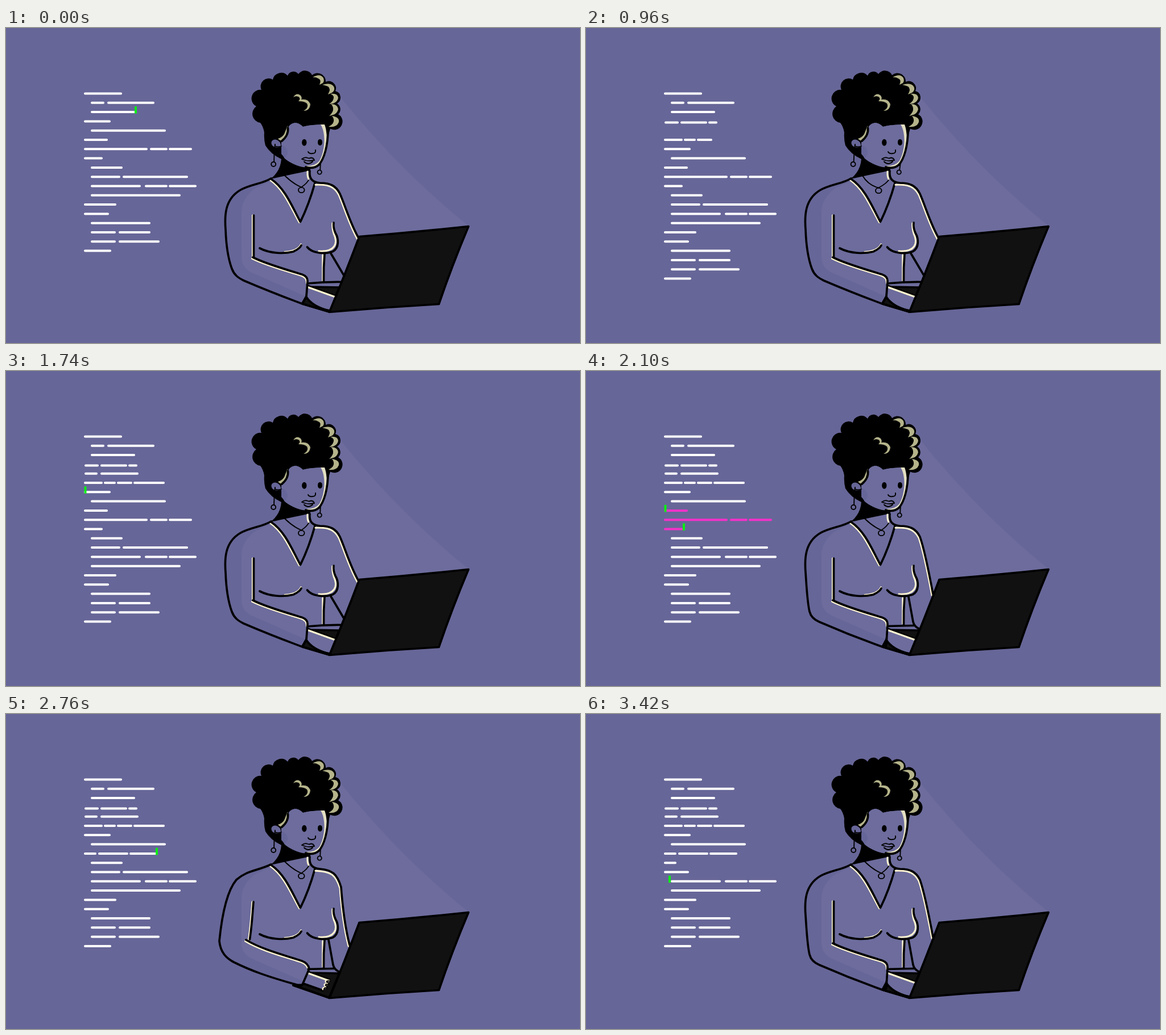
These frames come from a looping animation (1009 by 555 pixels, 3.54 s). An HTML page:

```html
<!DOCTYPE html>
<html lang="en">
<head>
<meta charset="utf-8">
<title>Coding at a laptop</title>
<style>
  html, body { margin: 0; width: 100%; height: 100%; overflow: hidden; background: #676698; }
  svg { display: block; width: 100%; height: 100%; }
  path, ellipse, circle { fill: none; stroke-linecap: round; stroke-linejoin: round; }
  .ink { stroke: #000; stroke-width: 3.7; }
  .thin { stroke: #000; stroke-width: 1.9; }
  .glow { stroke: #fff5d0; stroke-width: 3; }
  .black { fill: #000; }
  .lit { fill: #6d6c9d; }
  .shade { fill: #676698; }
  .olive { fill: #b5b48b; }
  .cream { fill: #e3dfc2; }
  .deck { fill: #111; }
  .code path { stroke-width: 4; }
</style>
</head>
<body>
<svg viewBox="0 0 1009 555" preserveAspectRatio="none">
  <path class="lit" d="M588 122Q690 249 813 349L620 367L568 500L525 472L432 431Q413 422 414 400V330Q412 300 440 281Q470 268 480 262L484 230L488 200L495 180L550 160Z"/>

  <g id="head">
    <path class="black" d="M482 205L484 230Q483 252 465 266L535 251V246Q505 247 484 222Z"/>
    <path class="black" d="M454 184Q452 173 447 167A16 16 0 0 1 440 138A15.400 15.400 0 0 1 449 109A14 14 0 0 1 469 91A15 15 0 0 1 495 84A11 11 0 0 1 514 81A14 14 0 0 1 538 83A14.500 14.500 0 0 1 562 95A12.500 12.500 0 0 1 579 111A12 12 0 0 1 582 133A12 12 0 0 1 584 152A14.500 14.500 0 0 1 570 177.500L568 184L565 196Q562 172 553 170Q531 171 522 174Q515 167 508 167Q496 169 495 180Q496 191 484 201L484 231Q465 222 456 207Q453 196 454 184Z"/>
    <path class="lit" d="M495 181Q496 169 508 167Q515 167 522 174Q531 171 553 170Q565 182 561 212Q555 241 538 245Q507 245 490 230Q484 222 484 203Z"/>
    <path class="shade" d="M484 207Q495 208 495 222L490 230Q483 221 484 207Z"/>
    <path class="olive" d="M495 172Q491 182 489 187Q485 193 478 195Q483 200 487 198Q495 190 495 173Z"/>
    <path class="ink" d="M495.500 176Q497 189 485 199"/>
    <path class="shade" d="M484 209Q474 213 468 207Q464 200 470 197Q476 195 482 202Z"/>
    <path class="thin" d="M484 208Q478 211 473 208"/>
    <path class="cream" d="M553 170C562 183 562 215 551 234Q543 244 526 243Q546 249 555 236C565 215 566 185 560 170Z"/>
    <path class="ink" d="M566 179C566 208 559 231 550 241Q541 249 527 245"/>
    <path class="olive" d="M539 87Q552 79 558 88Q560 94 557 97L551 100Q555 91 549 89Q544 86 539 87Z"/>
    <path class="olive" d="M556 100Q573 95 577 105Q578 111 573 114L566 117Q572 107 566 103Q561 101 556 100Z"/>
    <path class="olive" d="M570 116Q583 114 584 123Q583 130 575 133L568 134Q577 128 576 121Q574 117 570 116Z"/>
    <path class="olive" d="M571 134Q583 134 584 143Q582 151 575 153L568 155Q576 148 575 141Q574 136 571 134Z"/>
    <path class="olive" d="M573 155Q587 157 585 166Q581 176 567 174Q578 168 576 161Q575 157 573 155Z"/>
    <path class="olive" d="M505 122Q510 113 518 119Q521 123 519 126Q531 124 535 134Q534 146 523 146Q533 140 529 133Q525 129 514 129Q519 124 514 121Q509 119 505 122Z"/>
    <g id="open">
      <ellipse class="black" cx="524.300" cy="201.700" rx="4.200" ry="6"/>
      <ellipse class="black" cx="552" cy="201.400" rx="4" ry="5.700"/>
    </g>
    <path id="shut" class="ink" d="M521 203H527.500M549 203H555.500"/>
    <path class="thin" d="M544 215Q545 221 539 221Q533 222 531 218"/>
    <path class="thin" d="M520 231Q525 227 529 228.500Q533 230.500 536 228.500Q541 229 542 233M520 231Q531 236 541 233M524 235.500Q531 242.500 539 235.500"/>
  </g>

  <g id="jewels">
    <path id="chains" class="thin"/>
    <circle id="leftHoop" class="thin" cy="240" r="4"/>
    <circle id="rightHoop" class="thin" cy="254" r="3.600"/>
    <ellipse id="pendant" class="thin" rx="5.300" ry="4.600"/>
  </g>

  <g id="torso">
    <path class="glow" d="M464.500 268C489 285 501 317 515.500 342.500"/>
    <path class="ink" d="M466 266C491 283 503 315 517.500 341.500C527 322 537 295 543 273"/>
    <path class="glow" d="M530 253Q529.500 262 532 266"/>
    <path class="glow" d="M490 394.500Q513 393 518.500 381"/>
    <path class="ink" d="M446 388C465 398 490 398 505 394Q516 389 519 383"/>
    <path class="glow" d="M550 393C579 395 584 379 576 362Q573 352 574 344"/>
    <path class="ink" d="M529.500 386C538 397 560 399 574 394C586 388 585 371 579 361Q575 352 576 343"/>
    <path class="glow" d="M556.800 400V445"/>
    <path class="ink" d="M560 398Q558 422 558.500 447"/>
  </g>

  <g id="arms"></g>

  <path class="deck ink" d="M621 367.500Q715 360 813 349.500Q783 421 761 486.500Q665 492 568.500 500.500Q594 439 621 367.500Z"/>
  <g id="code" class="code"></g>
</svg>

<script>
const TICK = 60, TICKS = 59, PITCH = 16.3, TOP = 115.5;
const $ = id => document.getElementById(id);
const path = (cls, d, move = "") => `<path class="${cls}" d="${d}"${move && ` transform="translate(${move})"`}/>`;

// Three typing poses: A pulled in, B halfway, C reaching out.
const shoulder = "M534 252Q532 272 552 273";
const sleeve = "C455 415 500 428 520 434Q531 438 530 447";
const bent = { deck: "M531 456L586 457L568 500L521 486L528 473Z", inner: "M435.500 330L435.500 404",
  hand: "M529 455L580 473L569 496C550 493 537 485 528 473Z", palm: "M528 474C537 488 552 494 567 498",
  wrist: "M530 454L580 472", fingers: "", start: "M434 404", sleeve };
const near = { lower: "M567 398L575 442Q577 450 585 454", waist: "M531 449.500L576 448.500" };
const poses = {
  A: { ...bent,
    outer: "M466 265C450 275 430 275 411 286C385 302 384 330 386 355C387 385 390 405 397 424C401 435 408 440 418 445Q467 466 521 486L568 500",
    cuff: "M530 447L528 473L521 485",
    right: "C570 273 580 278 587 292C597 315 606 347 621 372",
    lower: "M571 397L594 436", waist: "M531 450Q560 447 592 447.500" },
  B: { ...bent, ...near,
    outer: "M466 265C450 275 430 275 411 286C385 302 384 330 386 355C388 385 389 408 393 424Q396 436 410 442Q465 466 521 486L568 500",
    cuff: "M530 447L528 482Q527 486 521 485",
    right: "C570 273 580 278 587 292C594 312 602 350 610 393" },
  C: { ...near,
    deck: "M531 456L586 457L568 500L505 478L521 477Z",
    outer: "M466 265C440 277 425 275 405 292C390 310 380 350 375 400C377 420 387 430 400 437C430 452 460 463 518 479M505 478L568 500",
    inner: "M435 331C433 355 432 375 428.500 397",
    start: "M422 398", sleeve: "C450 415 490 425 520 435Q531 439 533 449",
    cuff: "M533 449L521 477Q519 480 515 478",
    hand: "M532 455L570 469L557 487L522 475Z", palm: "M523 475L557 487", wrist: "M533 455L569 468",
    fingers: "M568 470Q561 469 562 472Q567 473 565 476Q559 475 560 478Q564 480 562 482Q557 481 557 485",
    right: "C573 275 582 281 589 305C592 345 597 380 604 407" }
};

$("arms").innerHTML = Object.entries(poses).map(([name, p]) => `<g id="pose${name}">` +
  path("deck ink", p.deck) + path("lit", p.hand) +
  path("glow", p.inner, "-2 0") + path("ink", p.inner) +
  path("glow", p.start + p.sleeve, "-1.500 2.200") +
  path("ink", p.wrist) + path("glow", p.wrist, "-1 2") +
  path("ink", p.palm) + (p.fingers && path("glow", p.fingers) + path("thin", p.fingers, "1.800 .500")) +
  path("ink", p.outer) + path("ink", p.start + p.sleeve + p.cuff) +
  path("glow", "M546 274" + p.right, "-2 2.200") + path("ink", shoulder + p.right) +
  path("ink", p.lower) + path("ink", p.waist) + "</g>").join("");

// Code rows: "from-to" strokes.
const head = ["139-202", "151-171 180-259", "151-225"];
const middle = ["139-182", "151-279"];
const cut = ["139-177", "139-247 255-282 288-325", "139-168"];
const drop = ["151-203", "151-199 207-318"];
const tail = ["151-235 246-282 288-333", "151-305", "139-192", "139-179", "151-252",
  "151-191 200-252", "151-191 200-268", "139-183"];
const typed = {
  first: ["140-161 168-211 217-229", 2, 10],
  second: ["140-159 168-231", 19, 23],
  third: ["139-168 174-191 197-220 226-277", 13, 18],
  fourth: ["139-157 164-213 219-264", 39, 43.2],
  fifth: ["139-157", 47, 48],
  sixth: ["139-179", 49, 50]
};
const rowEnd = row => +row.split("-").pop();
const rowY = i => TOP + i * PITCH;

function limit(key, t) {
  const [row, from, to] = typed[key];
  return 139 + (rowEnd(row) - 139) * Math.min(1, Math.max(0, (t - from) / (to - from)));
}

function typeRow(key, t) {
  const max = limit(key, t);
  const row = key === "fourth" && t < 43 ? "139-157 164-264" : typed[key][0];
  return row.split(" ").map(s => s.split("-").map(Number)).filter(s => s[0] < max)
    .map(([a, b]) => `${a}-${Math.min(b, max)}`).join(" ");
}

function rowsAt(t) {
  const rows = [...head];
  const add = (key, since) => { if (t >= since) rows.push(typeRow(key, t)); };
  add("first", 2);
  add("second", 12);
  add("third", 13);
  rows.push(...middle);
  if (t < 38) rows.push(...cut);
  add("fourth", 38);
  add("fifth", 47);
  add("sixth", 49);
  if (t < 57) rows.push(t >= 51 ? "141-203" : drop[0], drop[1]);
  return rows.concat(tail);
}

// First and last selected row, or null.
function selection(t) {
  if (t >= 33 && t < 38) return [8, 8 + Math.min(t - 33, 2)];
  if (t >= 52 && t < 57) return [11, t < 54 ? 11 : 12];
  return null;
}

function cursorAt(t) {
  if (t < 2) return [228, 2];
  if (t < 12) return [limit("first", t) + 3, 3];
  if (t < 14) return [139.5, t - 8];
  if (t < 18) return null;
  if (t < 24) return [limit("second", t) + 1, 4];
  if (t < 29) return [139.5, 5];
  if (t < 31) return [139.5, t - 23];
  if (t < 39) return [139.5, 8];
  if (t < 47) return [limit("fourth", t) + 1, 8];
  if (t < 49) return [limit("fifth", t) + 1, 9];
  if (t < 51) return [limit("sixth", t) + 1, 10];
  return [t < 57 ? 140 : 147, 11];
}

function drawCode(t) {
  const rows = rowsAt(t), picked = selection(t), cursors = [cursorAt(t)];
  if (picked) cursors.push([rowEnd(rows[picked[1]]) + 4, picked[1]]);
  const strokes = rows.map((row, i) => {
    const y = rowY(i) + (i === 3 && t >= 2 ? 2 : 0);
    const pink = picked && i >= picked[0] && i <= picked[1];
    const d = row && row.split(" ").map(s => `M${s.replace("-", ` ${y}H`)}`).join("");
    return `<path d="${d}" stroke="${pink ? "#f531c9" : "#fff"}"/>`;
  });
  const bars = cursors.filter(Boolean).map(([x, i]) =>
    `<rect x="${x - 2}" y="${rowY(i) - 10}" width="4" height="12.500" fill="#08f012"/>`);
  $("code").innerHTML = strokes.concat(bars).join("");
}

function drawJewels(t) {
  const s = t > 13 && t < 19 ? Math.sin((t - 13) / 6 * Math.PI) : 0;
  const left = 470.2 - s * .6, right = 551.2 - s, x = 519.3 - 5 * s, y = 285.5 + s;
  $("chains").setAttribute("d", `M473 205Q471 220 ${left + 1} 236M553 236L${right + 1} 250` +
    `M${490 - 4 * s} 260Q${504 - 8 * s} ${274 + 3 * s} ${x} ${y - 5}Q530 273 533 266`);
  $("leftHoop").setAttribute("cx", left);
  $("rightHoop").setAttribute("cx", right);
  $("pendant").setAttribute("cx", x);
  $("pendant").setAttribute("cy", y);
}

const poseOrder = "ABCBABCBABCBCBABCBABBABCBCBABB";
const show = (id, on) => { $(id).style.display = on ? "" : "none"; };

function draw(t) {
  for (const name in poses) show("pose" + name, poseOrder[t >> 1] === name);
  const blink = t >= 41 && t <= 43;
  show("open", !blink);
  show("shut", blink);
  drawJewels(t);
  drawCode(t);
}

const start = performance.now();
let last = -1;
function frame(now) {
  const t = Math.floor(Math.max(0, now - start) / TICK) % TICKS;
  if (t !== last) draw(last = t);
  requestAnimationFrame(frame);
}
draw(0);
requestAnimationFrame(frame);
</script>
</body>
</html>
```
